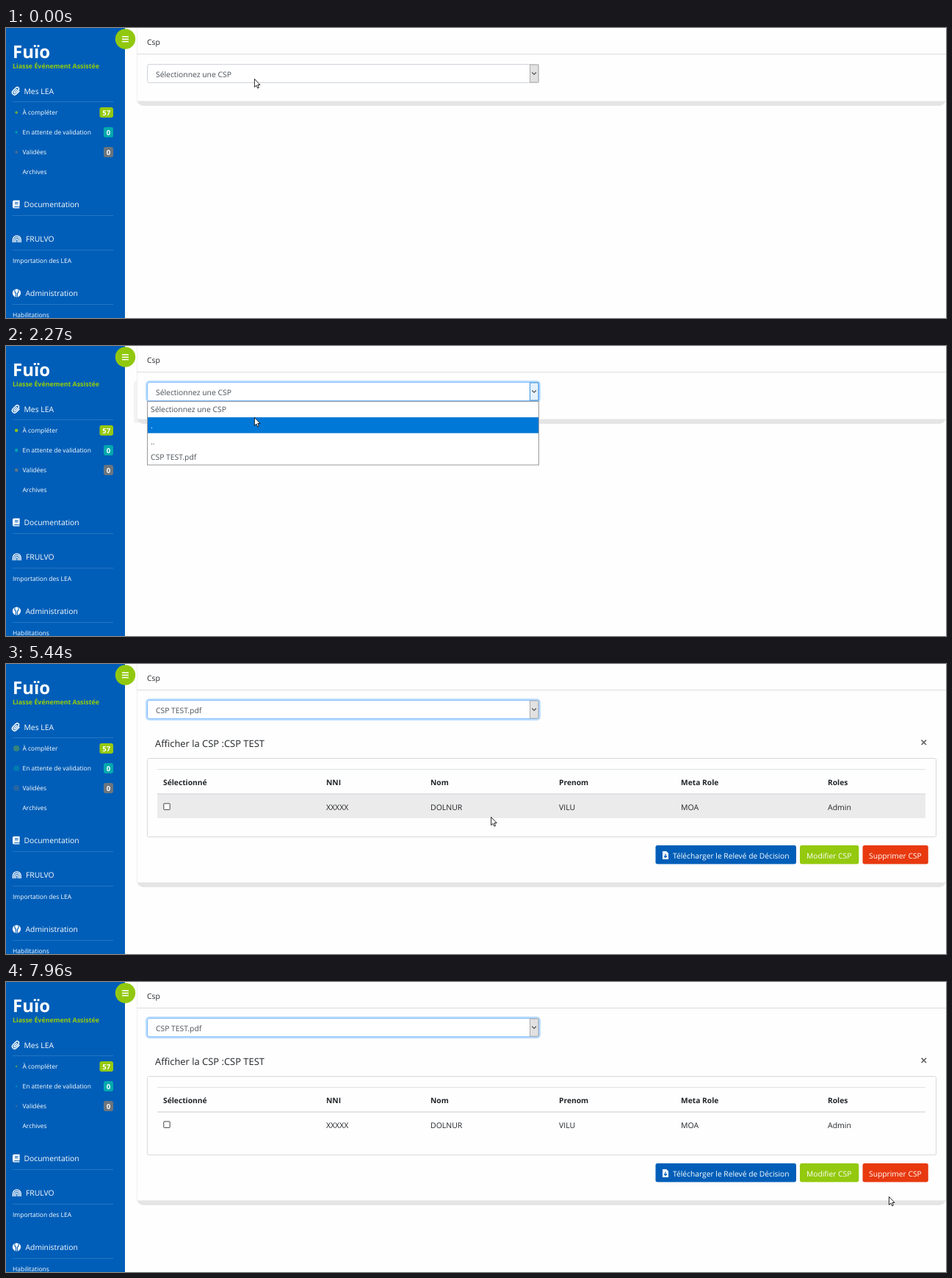
Animation, 1280 px wide and 395 px high, one loop 8 s. Source, as an HTML page:

```html
<!DOCTYPE html>
<html lang="fr">
<head>
<meta charset="utf-8">
<title>Csp</title>
<style>
  html, body { margin: 0; width: 100%; height: 100%; overflow: hidden; background: #fefefe; }
  svg { display: block; width: 100%; height: 100%; }
  text { font: 10.35px "Open Sans", "Noto Sans", sans-serif; fill: #212529; text-rendering: geometricPrecision; white-space: pre; }
  .side text { fill: #fff; }
  .side .small { font-size: 8.48px; }
  .side .brand { font-size: 24px; font-weight: 700; }
  .side .tagline { font-size: 8.87px; font-weight: 700; fill: #97cc0c; }
  .side .badge { font-size: 9.6px; font-weight: 700; text-anchor: middle; }
  .field text { fill: #495057; }
  .title { font-size: 12.94px; }
  .head text { font-size: 10.25px; font-weight: 700; }
  .cells text { font-size: 10.5px; }
  .buttons text { font-size: 10.28px; fill: #fff; }
  .line { fill: none; stroke: #fff; stroke-linecap: round; }
</style>
</head>
<body>
<svg viewBox="0 0 1280 395">
  <defs>
    <clipPath id="reveal"><rect id="revealBox" x="178" y="78" width="1102" height="0"/></clipPath>
  </defs>
  <rect width="1280" height="395" fill="#fefefe"/>

  <rect id="sideShade" x="174" y="48" width="8" height="57" rx="3" fill="#f2f2f2"/>
  <rect id="shadow" x="178" y="-20" width="1102" rx="9" fill="#e5e5e5"/>
  <rect id="card" x="178.6" y="-20" width="1101.4" rx="2" fill="#fefefe"/>
  <path d="M178 35.5H1280" stroke="#dcdcdc"/>
  <text x="192" y="23">Csp</text>

  <g id="panel" clip-path="url(#reveal)">
    <text class="title" x="203" y="112.5">Afficher la CSP :CSP TEST</text>
    <path d="M1246.6 103.6l6.4 6.4m0-6.4l-6.4 6.4" stroke="#666" stroke-width="1.7"/>
    <rect x="192.5" y="128.5" width="1074" height="107" rx="2" fill="none" stroke="#d9d9d9"/>
    <rect id="rowHover" x="206" y="177" width="1046" height="33" fill="#ebebeb"/>
    <path d="M206 143.5H1252" stroke="#dee2e6"/>
    <path d="M206 177H1252" stroke="#dadde0" stroke-width="1.5"/>
    <g class="head" id="head"></g>
    <g class="cells" id="cells"></g>
    <rect x="214.8" y="190" width="8.4" height="8.4" rx=".6" fill="#fff" stroke="#444"/>
    <g class="buttons">
      <rect x="884.5" y="247" width="191.5" height="25.5" rx="2.7" fill="#005eb8"/>
      <rect x="1081" y="247" width="80.3" height="25.5" rx="2.7" fill="#93c90e"/>
      <rect x="1166.5" y="247" width="89.3" height="25.5" rx="2.7" fill="#e8390f"/>
      <path d="M894 255h5.2l2.8 2.8V266h-8z" fill="#fff"/>
      <path d="M898 258.5v5m-2-2l2 2 2-2" fill="none" stroke="#005eb8" stroke-width="1.2"/>
      <text x="908" y="264.5">Télécharger le Relevé de Décision</text>
      <text x="1090" y="264.5">Modifier CSP</text>
      <text x="1175" y="264.5">Supprimer CSP</text>
    </g>
  </g>

  <g class="field">
    <rect id="glow" x="191.5" y="48.5" width="535" height="27" rx="4" fill="none" stroke="#bfdeff" stroke-width="3"/>
    <rect id="select" x="192.5" y="49.5" width="533" height="25" rx="2.7" fill="#fff"/>
    <text id="value" x="204" y="66.7"></text>
    <rect id="arrowBox" x="713.5" y="50" width="11.5" height="24"/>
    <path d="M716.3 60.5l2.8 2.8 2.8-2.8" fill="none" stroke="#444" stroke-width="1.1"/>
    <g id="list">
      <rect x="192.5" y="75.5" width="533" height="86.5" fill="#fff" stroke="#999"/>
      <rect id="marker" x="193" width="532" height="21.6" fill="#0078d7"/>
      <g id="options"></g>
    </g>
  </g>

  <g class="side">
    <rect width="162" height="395" fill="#005eb8"/>
    <text class="brand" x="9" y="41.3">Fuïo</text>
    <text class="tagline" x="9" y="55">Liasse Événement Assistée</text>
    <path d="M9 100.5H146M9 255.5H146M9 302.5H146M9 376.5H146" stroke="#2675c2"/>
    <text x="24.5" y="90">Mes LEA</text>
    <text x="24.5" y="244.2">Documentation</text>
    <text x="27" y="291">FRULVO</text>
    <text x="26.5" y="365">Administration</text>
    <text class="small" x="22.5" y="199">Archives</text>
    <text class="small" x="9" y="319.5">Importation des LEA</text>
    <text class="small" x="9" y="393.7">Habilitations</text>

    <path class="line" stroke-width="1.5" transform="rotate(45 13.5 86)"
      d="M16.7 83v5.5a3.2 3.2 0 0 1-6.4 0v-6a2.2 2.2 0 0 1 4.4 0v5.6a1.1 1.1 0 0 1-2.2 0v-4.6"/>
    <path fill="#fff" d="M11 234.8h7.6v8h-.9v1.6h.9v1H11a2 2 0 0 1-2-2v-6.6a2 2 0 0 1 2-2z"/>
    <path d="M12 237.6h4.6m-4.6 2h4.6m-5.4 4h6.2" stroke="#005eb8"/>
    <path class="line" stroke-width="1.3"
      d="M9.4 291.5v-3.2a5.4 5.4 0 0 1 10.8 0v3.2m-8.8 0v-3a3.4 3.4 0 0 1 6.8 0v3m-4.8 0v-2.8a1.4 1.4 0 0 1 2.8 0v2.8"/>
    <circle cx="14.5" cy="361" r="5.6" fill="#fff"/>
    <path d="M12 356.5v3.2l1.5 1.6v5.2M17 356.5v3.2l-1.5 1.6v5.2" fill="none" stroke="#005eb8" stroke-width="1.1"/>
    <g id="status"></g>
    <circle cx="162.5" cy="15" r="13.7" fill="#91c80f"/>
    <path d="M158 11.8h9m-9 3.4h9m-9 3.4h9" stroke="#fff" stroke-width="1.5"/>
  </g>

  <g id="cursor" stroke="#111" stroke-width=".9" fill="#fff" stroke-linejoin="round">
    <path id="arrow" d="M.4.4V11.5L3 9.2 4.7 13 6.4 12.2 4.8 8.5H8z"/>
    <path id="hand" d="M-1 1a1.1 1.1 0 0 1 2.2 0v4.4q1.1-.8 2 .2 1.1-.6 1.9.5 1.5-.3 1.7 1.2v3.4l-1.2 2.2v1.7H.4v-1.6L-3.6 8.5q-.2-1.5 1.3-1.2l1.3 1.2z"/>
  </g>
</svg>

<script>
const LOOP = 8000, STEP = 132.67;
const PLACEHOLDER = "Sélectionnez une CSP", FILE = "CSP TEST.pdf";
const FOCUS_AT = 660, OPEN_AT = 1200, CHOOSE_AT = 3450;
const LIST_TOP = 75, OPTION_HEIGHT = 21.6;

// time, x, y of the pointer tip
const POINTER = [
  [20, 338, 69], [270, 375, 71], [550, 357, 70], [1140, 357, 70],
  [1479, 358, 92], [1750, 356, 94], [2275, 338, 97], [2660, 330, 104],
  [2920, 325, 149], [4140, 325, 149], [5320, 650, 205], [5459, 660, 208],
  [5725, 790, 253], [5990, 1012, 284], [6255, 934, 265], [6500, 936, 266],
  [6790, 1060, 266], [7056, 1080, 302], [7450, 1112, 303], [7980, 1202, 292]
];

const $ = id => document.getElementById(id);
const set = (id, attrs) => {
  for (const name in attrs) $(id).setAttribute(name, attrs[name]);
};
const show = (id, visible) => { $(id).style.display = visible ? "" : "none"; };
const clamp01 = v => Math.min(1, Math.max(0, v));
const swing = p => 0.5 - Math.cos(clamp01(p) * Math.PI) / 2;

const columns = [214, 436, 578, 753, 919, 1119];
const rowMarkup = (labels, y) =>
  labels.map((label, i) => `<text x="${columns[i]}" y="${y}">${label}</text>`).join("");
$("head").innerHTML = rowMarkup(["Sélectionné", "NNI", "Nom", "Prenom", "Meta Role", "Roles"], 164.5);
$("cells").innerHTML = rowMarkup(["", "XXXXX", "DOLNUR", "VILU", "MOA", "Admin"], 198.5);

$("options").innerHTML = [PLACEHOLDER, ".", "..", FILE].map((label, i) =>
  `<text x="197" y="${90.4 + i * 21.55}">${label}</text>`).join("");

$("status").innerHTML = [
  ["À compléter", 57, "#93c90e", 18.5],
  ["En attente de validation", 0, "#00a9ad", 13],
  ["Validées", 0, "#6c757d", 13]
].map(([label, count, color, width], i) => {
  const y = 115 + i * 27;
  return `<circle class="dot" cx="14.2" cy="${y}" fill="${color}"/>
    <text class="small" x="22.5" y="${y + 3.3}">${label}</text>
    <rect x="${146 - width}" y="${y - 7}" width="${width}" height="14" rx="2.7" fill="${color}"/>
    <text class="badge" x="${146 - width / 2}" y="${y + 3.6}">${count}</text>`;
}).join("");
const dots = document.querySelectorAll(".dot");

function pointerAt(t) {
  const next = POINTER.findIndex(key => key[0] > t);
  if (next === 0) return POINTER[0].slice(1);
  if (next < 0) return POINTER[POINTER.length - 1].slice(1);
  const [t0, x0, y0] = POINTER[next - 1], [t1, x1, y1] = POINTER[next];
  const p = (t - t0) / (t1 - t0);
  return [x0 + (x1 - x0) * p, y0 + (y1 - y0) * p];
}

function render(t) {
  const [x, y] = pointerAt(t);
  const focused = t >= FOCUS_AT, chosen = t >= CHOOSE_AT;
  const open = t >= OPEN_AT && !chosen;

  // growing status dots
  const phase = (t / 730 + 0.34) % 1;
  for (const dot of dots) {
    dot.setAttribute("r", 5 * phase);
    dot.setAttribute("opacity", 1 - Math.abs(2 * phase - 1));
  }

  // card slides down once a file is chosen
  const bottom = 99.5 + 198 * swing((t - 3380) / 380) * chosen;
  set("card", { height: bottom + 20 });
  set("shadow", { height: bottom + 26.5 });
  set("revealBox", { height: bottom - 78 });
  show("panel", chosen);
  show("sideShade", focused && !chosen);
  show("rowHover", chosen && y >= 177 && y < 210);

  set("glow", { opacity: clamp01((t - FOCUS_AT + 50) / 150) });
  set("select", { stroke: focused ? "#80bdff" : "#ced4da" });
  const active = focused && !chosen;
  set("arrowBox", { fill: active ? "#e5f1fb" : "#e1e1e1", stroke: active ? "#3c94dd" : "#adadad" });
  $("value").textContent = chosen ? FILE : PLACEHOLDER;

  show("list", open);
  const hovered = Math.min(3, Math.max(0, Math.floor((y - LIST_TOP) / OPTION_HEIGHT)));
  set("marker", { y: LIST_TOP + 0.5 + hovered * OPTION_HEIGHT });
  [...$("options").children].forEach((option, i) => {
    option.style.fill = i === hovered ? "#fff" : "";
  });

  const onButton = chosen && y >= 247 && y < 273 && x >= 885 && x < 1256;
  show("hand", onButton);
  show("arrow", !onButton);
  set("cursor", { transform: `translate(${x} ${y})` });
}

function tick() {
  const t = performance.now() % LOOP;
  render(Math.floor((t + 12) / STEP) * STEP + 20);
  requestAnimationFrame(tick);
}
tick();
</script>
</body>
</html>
```
